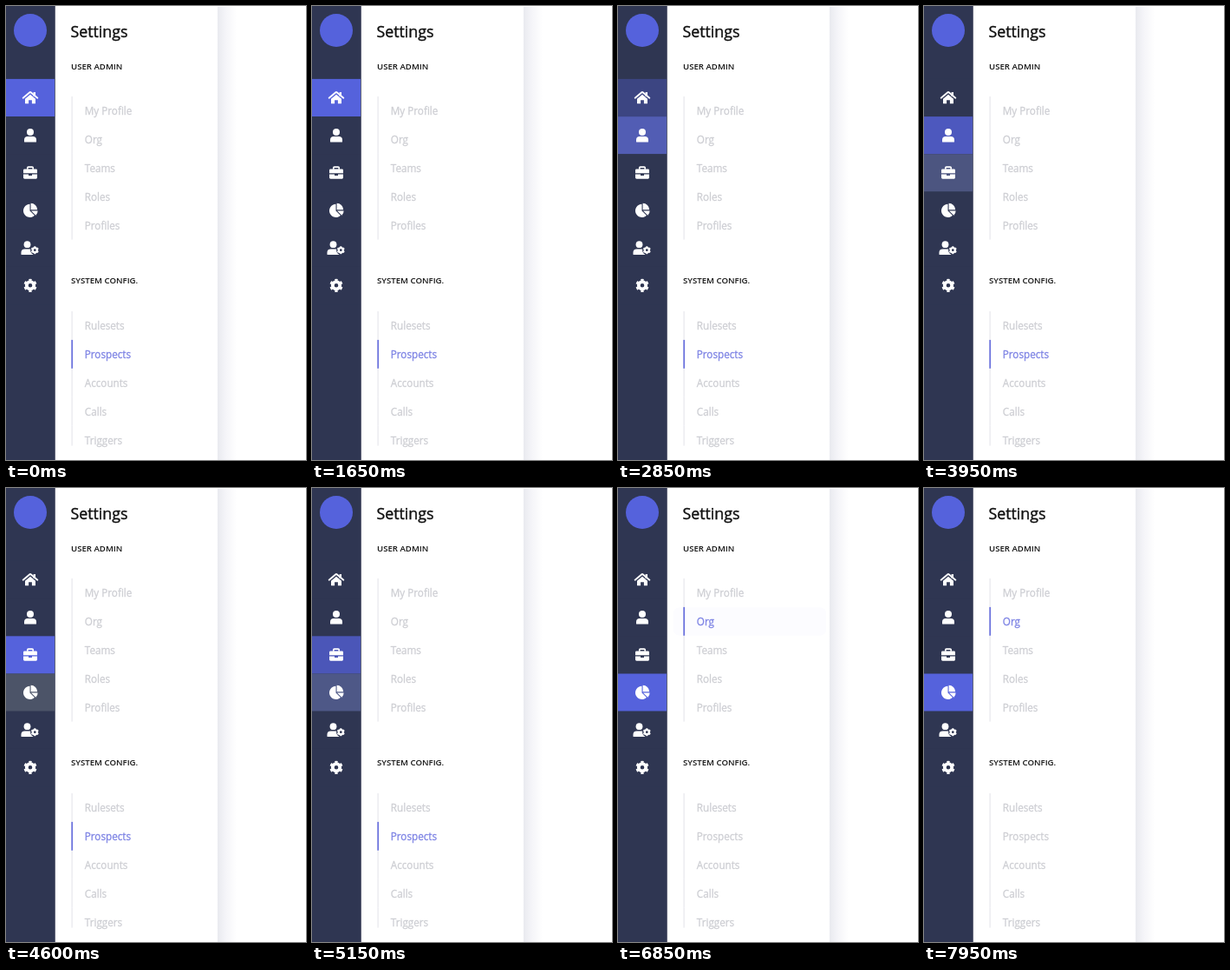
Write an HTML page that moves like this. It is 346x522 px and loops after 8 s.

```html
<!DOCTYPE html>
<html lang="en">
<head>
<meta charset="utf-8">
<title>Settings</title>
<style>
  html, body { margin: 0; width: 100%; height: 100%; overflow: hidden; background: #fff; }
  svg { display: block; width: 100%; height: 100%; }
  text { font-family: "Open Sans", sans-serif; }
  .title { font-size: 17.8px; fill: #111; stroke: #111; stroke-width: .4px; }
  .head { font-size: 9.65px; font-weight: 600; fill: #111; }
  .item { font-size: 11.7px; stroke-width: .3px; }
</style>
</head>
<body>
<svg id="stage" viewBox="0 0 346 522" preserveAspectRatio="none">
  <defs>
    <linearGradient id="shade">
      <stop offset="0" stop-color="#e9eaef"/>
      <stop offset=".4" stop-color="#f4f4f8"/>
      <stop offset="1" stop-color="#fff"/>
    </linearGradient>
    <g id="gear" fill="none" stroke="#fff">
      <circle r="4.2" stroke-width="3.8"/>
      <circle r="6.5" stroke-width="2.2" pathLength="12" stroke-dasharray="1 1" stroke-dashoffset="1.5"/>
    </g>
  </defs>
  <rect x="244" y="1" width="22" height="521" fill="url(#shade)"/>
  <rect width="56.7" height="522" fill="#1f2440"/>
  <rect width="56" height="522" fill="#2f3652"/>
  <circle cx="28" cy="28" r="19" fill="#5562dc"/>
  <text class="title" x="74.5" y="36">Settings</text>
</svg>
<script>
const LOOP = 8000, FADE = 300;
const NAVY = [47, 54, 82], GREY = [76, 84, 104], BLUE = [85, 98, 220];
const PALE = [205, 206, 211], DIM = [178, 179, 192], VIOLET = [125, 131, 228];
const LINE = [238, 238, 242], MARK = [108, 115, 221];
const stage = document.getElementById('stage');

const person = 'M-7 7.5v-2q0-4 4-4h6q4 0 4 4v2q0 .5-.8.5h-12.4q-.8 0-.8-.5z';
const icons = [
  `<path d="M-8.3.4L-.6-6Q0-6.5.6-6L8.3.4" fill="none" stroke-width="1.9" stroke="#fff" stroke-linecap="round"/>
   <path d="M3.6-6.3h2.4v5h-2.4zM0-3.6L6 1.4v5q0 .6-.6.6h-3.5v-4H-1.9v4h-3.5q-.6 0-.6-.6v-5z"/>`,
  `<circle cy="-3.6" r="4"/><path d="${person}"/>`,
  `<path d="M-3.2-4v-1.6q0-.9.9-.9h4.6q.9 0 .9.9V-4" fill="none" stroke="#fff" stroke-width="1.7"/>
   <path d="M-6.6-4.3H6.6Q8-4.3 8-2.9V.6H-8V-2.9Q-8-4.3-6.6-4.3zM-8 1.7h6v1.6h4V1.7h6v3.9Q8 7 6.6 7H-6.6Q-8 7-8 5.6z"/>`,
  `<path d="M-.5-7.1V.5L4.9 5.9A7.6 7.6 0 1 1-.5-7.1z"/>
   <path d="M.6-8.2A7.6 7.6 0 0 1 8.2-.6H.6zM1 .5H8.6A7.6 7.6 0 0 1 6.4 5.9z"/>`,
  `<circle cx="-3.5" cy="-3.9" r="3.9"/><path d="${person}" transform="translate(-3.5)"/>
   <circle cx="5.3" cy="2.6" r="5.2" fill="#2f3652"/>
   <use href="#gear" transform="translate(5.3 2.6) scale(.6)"/>`,
  '<use href="#gear"/>'
];

// hover: [in, out], on / off: click times
const tiles = [
  { on: -FADE, off: 2670 },
  { hover: [2550], on: 2670, off: 3860 },
  { hover: [3700], on: 3860, off: 5050 },
  { hover: [4300], on: 5050 }, {}, {}
];
const rows = [
  { name: 'My Profile', hover: [5730, 6000] },
  { name: 'Org', hover: [5950, 6700], on: 6200 },
  { name: 'Teams' }, { name: 'Roles' }, { name: 'Profiles' },
  { name: 'Rulesets' }, { name: 'Prospects', on: -FADE, off: 6200 },
  { name: 'Accounts' }, { name: 'Calls' }, { name: 'Triggers' }
];

function add(markup) {
  const g = document.createElementNS('http://www.w3.org/2000/svg', 'g');
  g.innerHTML = markup;
  stage.append(g);
  return [...g.children];
}

tiles.forEach((tile, i) => {
  const y = 83.9 + 43.2 * i;
  [tile.box] = add(`<rect y="${y}" width="56" height="43.2"/>
    <g fill="#fff" transform="translate(28 ${y + 21.4})">${icons[i]}</g>`);
});

[['USER ADMIN', 72.6], ['SYSTEM CONFIG.', 318.9]].forEach(([label, y], i) => {
  add(`<text class="head" x="75" y="${y}">${label}</text>`);
  rows.slice(5 * i, 5 * i + 5).forEach((row, k) => {
    const top = 104 + 247 * i + 32.9 * k, last = i && k === 4;
    [row.back, row.bar, row.text] = add(
      `<rect x="64" y="${top + .5}" width="176" height="32" rx="6" fill="#5562dc"/>
       <rect x="75.3" y="${top}" width="1.8" height="${last ? 23 : 33}"/>
       <text class="item" x="90.8" y="${top + 21}">${row.name}</text>`);
  });
});

function ramp(t, start = Infinity) {
  const u = Math.min(1, Math.max(0, (t - start) / FADE));
  return u * u * (3 - 2 * u);
}
const mix = (a, b, u) => a.map((v, i) => v + (b[i] - v) * u);
const css = c => `rgb(${c.map(Math.round)})`;

function state(t, { hover = [], on, off }) {
  return [ramp(t, hover[0]) - ramp(t, hover[1]), ramp(t, on), ramp(t, off)];
}

function draw(now) {
  const t = now % LOOP;
  for (const tile of tiles) {
    const [hover, on, off] = state(t, tile);
    tile.box.setAttribute('fill', css(mix(mix(mix(NAVY, GREY, hover), BLUE, on), NAVY, off)));
  }
  for (const row of rows) {
    const [hover, on, off] = state(t, row), active = on * (1 - off);
    const ink = css(mix(mix(PALE, DIM, hover), VIOLET, active));
    row.back.setAttribute('opacity', .035 * hover);
    row.bar.setAttribute('fill', css(mix(LINE, MARK, active)));
    row.text.setAttribute('fill', ink);
    row.text.setAttribute('stroke', ink);
  }
}

const start = performance.now();
function tick() {
  draw(performance.now() - start);
  requestAnimationFrame(tick);
}
tick();
</script>
</body>
</html>
```
